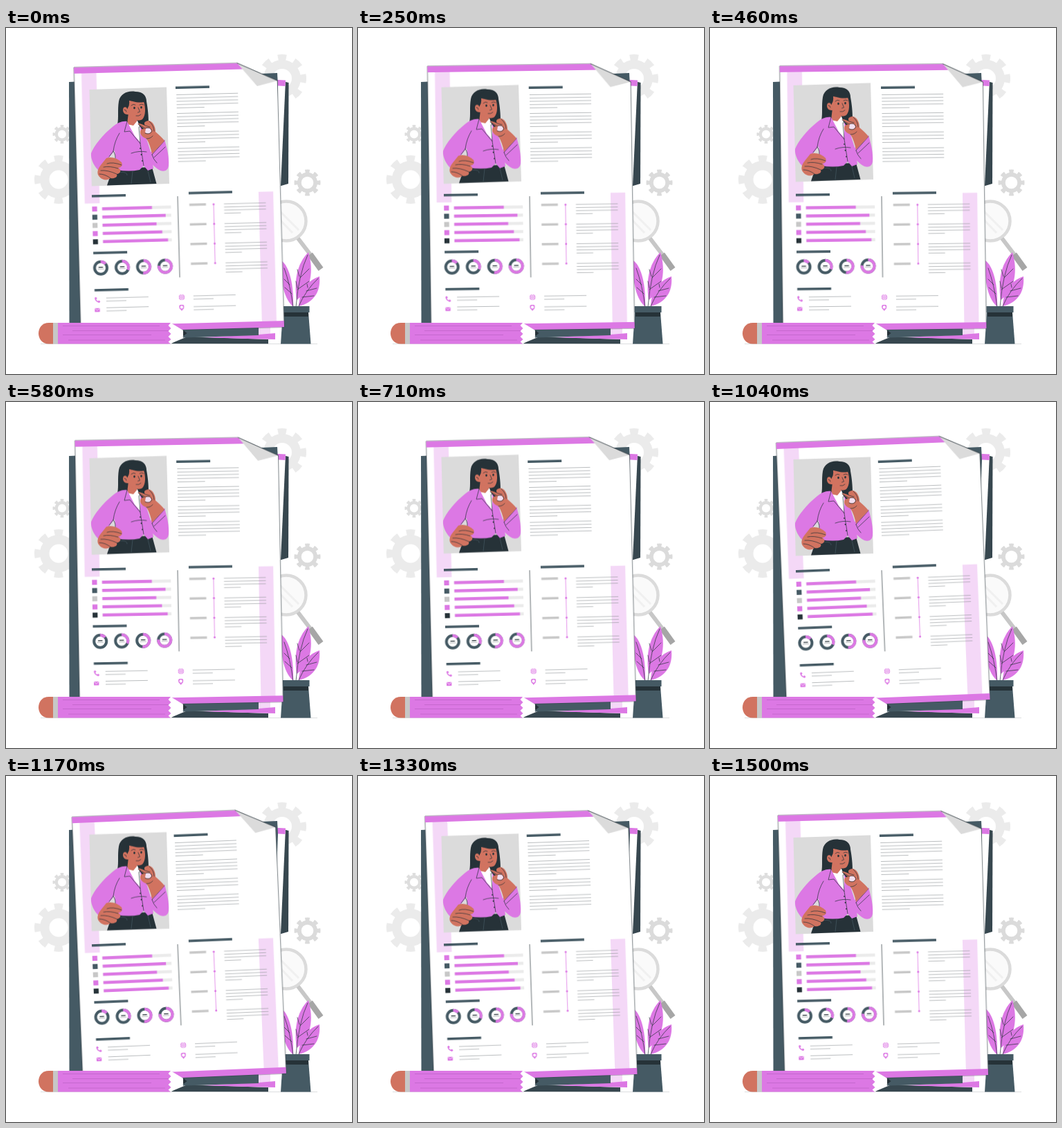
An HTML page that plays this animation: 500x500 px, repeating every 1540 ms.

```html
<!DOCTYPE html>
<html lang="en">
<head>
<meta charset="utf-8">
<title>Curriculum vitae</title>
<style>
  html, body { margin: 0; width: 100%; height: 100%; overflow: hidden; background: #fff; }
  svg { display: block; width: 100vw; height: 100vh; }
  .pink { fill: #dc78e4; }
  .pale { fill: #f4d8f7; }
  .slate { fill: #455a64; }
  .deep { fill: #37474f; }
  .ink { fill: #263238; }
  .skin { fill: #d17360; }
  .grey { fill: #c7c7c7; }
  .mist { fill: #dbdbdb; }
  .white { fill: #fff; }
  .line { fill: none; stroke: #263238; stroke-width: .7; stroke-linecap: round; stroke-linejoin: round; }
  .text { fill: none; stroke: #8b9194; stroke-width: .6; }
  .gear circle { fill: none; }
  #page { transform-origin: 250px 242px; animation: sway 1540ms linear infinite; }
  #photo { animation: float 1540ms linear infinite; }
  /* 1500 ms of motion, then a 40 ms rest */
  @keyframes sway {
    0%, 97.403%, 100% { transform: rotate(0deg); }
    24.351% { transform: rotate(1deg); }
    73.052% { transform: rotate(-1deg); }
  }
  @keyframes float {
    0%, 97.403%, 100% { transform: translateY(0); }
    48.701% { transform: translateY(-10px); }
  }
</style>
</head>
<body>
<svg viewBox="0 0 500 500">
  <g id="gears"></g>

  <!-- Sheets behind -->
  <path class="deep" d="M400 77L408.500 79L408 225L396 228.500Z"/>
  <path class="white" d="M380 75L404 76L397 228L390 250Z"/>
  <path class="pink" d="M385 74.500L404 75.500L403.500 84L385 83Z"/>
  <path class="slate" d="M91 78L392 65L393 84L380 430H91.500Z"/>
  <path class="deep" d="M238 456L262 446L379 450V456.500Z"/>
  <path class="pale" d="M364 425H382V443H364Z"/>
  <path class="pink" d="M285 447L365 443L389 441V450L330 448.500Z"/>
  <path class="slate" d="M250 430L365 428V444L256 447.500Z"/>
  <path d="M50 456.500H450" stroke="#c4c8ca" stroke-width=".6"/>

  <!-- Magnifier -->
  <circle cx="405" cy="279" r="28.500" fill="#fafafa" stroke="#dbdbdb" stroke-width="4.500"/>
  <path d="M394 263L423 292M388 269L414 296" stroke="#f0f0f0" stroke-width="3"/>
  <path d="M422 304L441 329" stroke="#c7c7c7" stroke-width="6"/>
  <path d="M439.500 327L455 348.500" stroke="#a6a6a6" stroke-width="8.500"/>

  <!-- Plant -->
  <g class="pink">
    <path d="M398 336C410 345 416 372 415 403C403 392 396 370 398 336Z"/>
    <path d="M420 393C416 366 420 341 437 324C445 350 441 380 420 393Z"/>
    <path d="M423 402C424 380 435 365 453 359C455 382 444 397 423 402Z"/>
  </g>
  <path class="line" d="M402 347Q411 372 415 403M436 328Q423 355 419 403M451 362Q433 379 423 402M410 371L402 363M413 384L403 375M424 359L421 349M425 361L438 348M421 376L419 366M421 378L438 366M436 375L435 370M434 380L449 376M428 389L445 387"/>
  <path class="slate" d="M400 411H437L440.500 456.500H397Z"/>
  <path class="ink" d="M401 411H437V417H401Z"/>
  <path class="slate" d="M399.500 402H438.500V411H399.500Z"/>

  <!-- Main sheet -->
  <g id="page">
    <g transform="rotate(-1.5 250 242)">
      <path class="white" d="M103 53H339L396.500 80L397 436H103Z" stroke="#263238" stroke-width=".6"/>
      <path class="pink" d="M103 53.300H339L348 62H103ZM103 427H397V436H103Z"/>
      <path class="pale" d="M113.600 62H135.200V250.300H113.600ZM365 239.800H386.200V427H365Z"/>
      <path class="mist" d="M339 53L396.500 80L367 87Z"/>
      <path class="line" d="M339 53L396.500 80" stroke-width=".5"/>
      <path class="line" d="M248 243.500V360"/>
      <g class="slate">
        <path d="M249 84.500h49v3.400h-49zM124 238h49v3.400h-49zM124 320.300h49v3.400h-49zM124.400 374h49v3.400h-49zM264 237.300h63v3.400h-63z"/>
      </g>
      <g id="notes" class="text"></g>
      <g id="skills"></g>
      <g id="rings"></g>
      <path d="M299.700 256V341" stroke="#dc78e4" stroke-width=".8"/>
      <g id="steps"></g>

      <!-- Contact icons -->
      <path d="M125 387.500Q125.500 391.500 131 393.500" fill="none" stroke="#dc78e4" stroke-width="1.500"/>
      <path class="pink" d="M124 387l2-1.500 1.800 2-1.500 1.700zM129 391.500l1.400-1 2 1.800-1.400 1.800z"/>
      <rect class="pink" x="124" y="401.800" width="7.400" height="5.400" rx=".6"/>
      <path d="M124.300 402.300l3.400 2.600 3.400-2.600" fill="none" stroke="#fff" stroke-width=".7"/>
      <circle class="pink" cx="250.100" cy="389.200" r="4.100"/>
      <path d="M246 389.200h8.200M250.100 385v8.400M247 387.200h6.200M247 391.200h6.200" stroke="#fff" stroke-width=".6"/>
      <ellipse cx="250.100" cy="389.200" rx="2.200" ry="4" fill="none" stroke="#fff" stroke-width=".6"/>
      <path class="pink" d="M249.700 409C243.500 400.500 247 400 249.700 400S256 400.500 249.700 409Z"/>
      <circle cx="249.700" cy="403.500" r="2.800" fill="#fff" stroke="#dc78e4" stroke-width="1.300"/>
    </g>
  </g>

  <!-- Portrait -->
  <g id="photo">
    <path class="mist" d="M120.500 89L232 85.500L236 225L123.800 228.500Z"/>
    <path class="ink" d="M163 106C165 95 176 90 187 92C198 92 203 98 203 106C205 117 206 126 206 140L200 160L170 152L161 139C163 130 161 118 163 106Z"/>
    <path class="ink" d="M157 203C151 211 149 219 146 227.500L217.500 225L211 201Z"/>
    <path d="M183 207L181 225M205 206L209 223M164 208Q176 208 175 213" fill="none" stroke="#455a64" stroke-width=".7"/>
    <path class="white" d="M174 137L190 134L196 150L193 170L184 161Z"/>
    <path class="skin" d="M177 122L190 128L189 135L184 141L175 139Z"/>
    <!-- Jacket -->
    <path class="pink" d="M175 135C168 134 161 137 155 142C140 154 127 170 123 181C122 190 128 201 135 207L151 195L148 188L157 177L160 205Q178 208 193 205L199 199L205 206L213 203L210 182L203 160L194 142L194 165L186 156Z"/>
    <path class="pink" d="M229 161C233 174 236 188 235 199C234 206 229 208 223 206C213 201 207 192 204 184Z"/>
    <path class="line" d="M175 135L171 150L179 149L194 167L192 143M194 167L199 199M164 152Q157 163 155 178L149 186M155 178Q160 184 157 193M181 181Q192 177 203 179M211 183L229 163M211 183Q213 190 218 195M214 187L230 172"/>
    <g class="ink"><circle cx="194" cy="174" r=".9"/><circle cx="195.500" cy="183" r=".9"/><circle cx="197" cy="192" r=".9"/></g>
    <!-- Face -->
    <path class="skin" d="M176 106C178 103 190 101 199 106C202 115 202 127 197 132C190 136 180 132 177 125C171 126 167 120 170 115C173 113 175 116 176 117Z"/>
    <path class="ink" d="M175 117C172 104 178 94 189 94C198 94 203 100 203 110L199 107C190 109 181 105 178 105Q179 112 175 117Z"/>
    <path class="line" d="M181 112Q184 109 187 111M193 111Q196 109 199 111M191 115L193.500 121L190.500 122M188 127Q192 128 195 125M171 118Q174 118 174 121"/>
    <ellipse class="ink" cx="185.500" cy="115.500" rx="1.300" ry="1.700"/>
    <ellipse class="ink" cx="195.500" cy="114.800" rx="1.300" ry="1.700"/>
    <!-- Raised hand -->
    <path class="skin" d="M191 139C192 136 198 140 201 141C198 136 202 134 207 134C213 136 216 143 216 150C221 154 226 159 229 163L211 182C209 173 207 166 203 160C197 158 193 153 194 149C195 146 198 145 200 146Z"/>
    <path d="M202 145Q209 143 210 149Q207 155 201 151Z" fill="#f2dff0"/>
    <path class="line" d="M191 139L201 145Q209 142 211 149Q208 155 201 152M201 141L208 143M207 135Q214 141 214 149M203 160Q209 160 212 156"/>
    <!-- Hand on hip -->
    <path class="skin" d="M145 188C153 185 162 189 167 194C169 199 166 202 162 202C168 205 165 211 160 211C162 216 156 218 151 217C147 221 139 220 135 215C130 210 133 203 137 198Z"/>
    <path class="line" d="M167 198Q154 193 146 196M162 203Q150 199 141 201M160 211Q147 205 137 206M151 217Q143 211 135 211"/>
  </g>

  <!-- Pencil -->
  <path class="skin" d="M68 426H62C42 426 42 456.500 62 456.500H68Z"/>
  <path class="grey" d="M68 426H75V456.500H68Z"/>
  <path class="white" d="M234 426H238L257 437.500V445L238 456.500H234Z"/>
  <path class="ink" d="M256 436.500L261.500 441L256 445.500Z"/>
  <path class="pink" d="M75 426H238L234.500 430L238.500 434L234.500 438L238.500 442L234.500 446L238.500 450L234.500 453.500L238 456.500H75Z"/>
  <path d="M82 430.500H222M96 437.500H235M82 443.500H210M90 451H230" stroke="#b55fbf" stroke-width=".6"/>
</svg>
<script>
  const add = (id, html) => document.getElementById(id).innerHTML += html;
  const rule = (x, y, w) => `<path d="M${x} ${y}h${w}"/>`;
  const rect = (x, y, w, h, cls, fill = '') =>
    `<rect x="${x}" y="${y}" width="${w}" height="${h}" class="${cls}" ${fill && `fill="${fill}"`}/>`;

  // A solid ring with dashes as teeth
  const gear = (x, y, r, hole, color) => {
    const rim = r * .77, mid = (rim + hole) / 2, tooth = r * .86;
    return `<g class="gear" stroke="${color}" transform="translate(${x} ${y})">
      <circle r="${mid}" stroke-width="${rim - hole}"/>
      <circle r="${tooth}" stroke-width="${r * .28}" pathLength="16" stroke-dasharray="1 1" stroke-dashoffset=".5"/></g>`;
  };
  add('gears', gear(76, 219, 35, 13.5, '#ebebeb') + gear(399, 73, 35, 14, '#ebebeb')
    + gear(81, 153.500, 13.500, 6, '#dedede') + gear(435.500, 223.500, 19, 8.800, '#dbdbdb'));

  // Paragraph: full lines, then a short last one
  const para = (x, y, w, full, last, gap) => {
    let out = '';
    for (let i = 0; i < full; i++) out += rule(x, y + i * gap, w);
    return out + rule(x, y + full * gap, last);
  };
  [[96.5, 4], [123.5, 4], [151.2, 3], [174, 4]].forEach(([y, n]) =>
    add('notes', para(250, y, 89, n, 40, 4.75)));
  for (let i = 0; i < 4; i++) {
    const y = 255.9 + i * 28.4;
    add('notes', para(314.7, y, 60.5, 3, 24, 4.5));
    add('steps', rect(264.6, y - 1.7, 24, 3.4, 'grey') + `<circle class="pink" cx="299.7" cy="${y}" r="1.5"/>`);
  }
  [[141, 387.3], [141, 401.5], [267, 387.7], [267, 403.2]].forEach(([x, y]) =>
    add('notes', para(x, y, 61, 1, 29, 4.6)));

  const marks = ['pink', 'slate', 'grey', 'pink', 'ink'];
  [72, 91.5, 78, 86, 94].forEach((w, i) => {
    const y = 258.4 + i * 11.85;
    add('skills', rect(124, y - 3.6, 7.2, 7.2, marks[i])
      + rect(138.5, y - 2.2, 99.5, 4.4, '', '#ebebeb') + rect(138.5, y - 2.2, w, 4.4, 'pink'));
  });

  [.14, .32, .52, .77].forEach((part, i) =>
    add('rings', `<g transform="translate(${134.3 + i * 31} 343.8)" fill="none" stroke-width="4">
      <circle r="9" fill="#fff" stroke="#455a64"/>
      <circle r="9" stroke="#dc78e4" pathLength="1" stroke-dasharray="${part} 1" transform="rotate(-90)"/>
      <path d="M-3.200 -1h6.400" stroke="#263238" stroke-width="1.300"/>
      <path d="M-4.500 1.500h9" stroke="#8b9194" stroke-width=".6"/></g>`));
</script>
</body>
</html>
```
